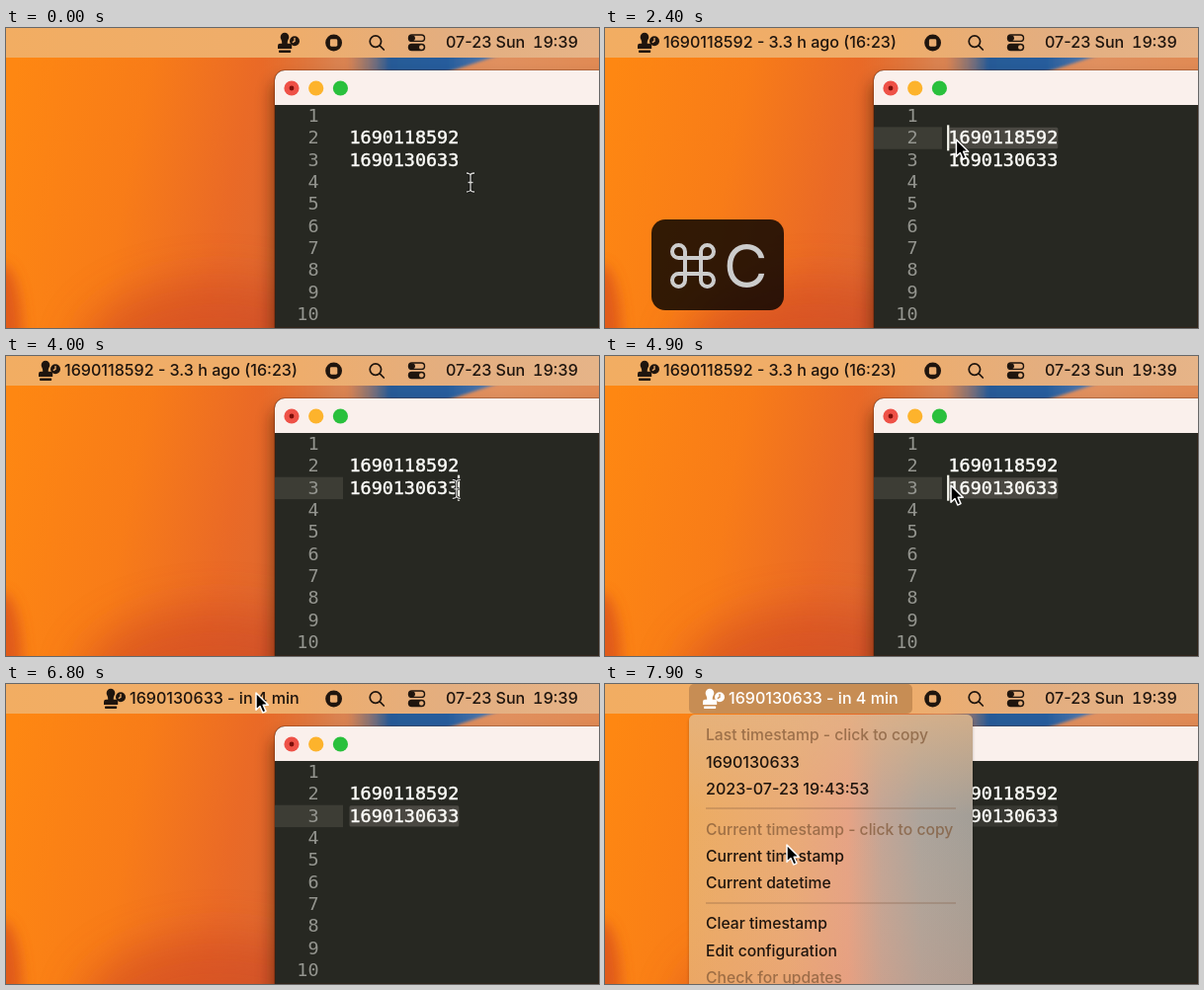
These frames come from a looping animation (600 by 304 pixels, 8000 ms). An HTML page:

```html
<!DOCTYPE html>
<html lang="en">
<head>
<meta charset="utf-8">
<title>Timestamp in the menu bar</title>
<style>
  html, body { margin: 0; width: 100%; height: 100%; overflow: hidden; background: #f0801c; }
  svg { display: block; width: 600px; height: 304px; }
  text { white-space: pre; }
  .ui { font: 500 16.1px Inter, Roboto, sans-serif; fill: currentColor; }
  .clock { font-variant-numeric: tabular-nums; }
  .letters { font-size: 15.7px; }
  .dim { fill: #7d5535; fill-opacity: .7; }
  .code { font: 18.4px "DejaVu Sans Mono", "Liberation Mono", monospace; fill: #fcfcf8; stroke: #fcfcf8; stroke-width: .45px; }
  .num { fill: #94958f; stroke: none; text-anchor: end; }
  .keys { font: 400 61px Inter, Roboto, sans-serif; fill: #ccc; }
</style>
</head>
<body>
<svg viewBox="0 0 600 304" color="#1f150e">
  <defs>
    <linearGradient id="wall" gradientUnits="userSpaceOnUse" x1="0" y1="90" x2="290" y2="150">
      <stop offset="0" stop-color="#fe8712"/><stop offset=".45" stop-color="#f87c18"/>
      <stop offset=".8" stop-color="#ea6a26"/><stop offset="1" stop-color="#df682f"/>
    </linearGradient>
    <linearGradient id="strip" gradientUnits="userSpaceOnUse" x1="260" y1="0" x2="600" y2="0">
      <stop offset="0" stop-color="#e27a38" stop-opacity="0"/><stop offset=".22" stop-color="#d98250"/>
      <stop offset=".7" stop-color="#e0905f"/><stop offset="1" stop-color="#e08a54"/>
    </linearGradient>
    <linearGradient id="petal" gradientUnits="userSpaceOnUse" x1="345" y1="0" x2="500" y2="0">
      <stop offset="0" stop-color="#5a6a88" stop-opacity="0"/><stop offset=".28" stop-color="#265a96"/>
      <stop offset=".65" stop-color="#255c9c"/><stop offset="1" stop-color="#5f7fae"/>
    </linearGradient>
    <linearGradient id="bar">
      <stop offset="0" stop-color="#f2ad62"/><stop offset=".5" stop-color="#eead6c"/>
      <stop offset=".75" stop-color="#e3ae80"/><stop offset="1" stop-color="#e6b488"/>
    </linearGradient>
    <linearGradient id="panel">
      <stop offset="0" stop-color="#ecac62"/><stop offset=".35" stop-color="#eaab76"/>
      <stop offset=".56" stop-color="#e6a385"/><stop offset=".68" stop-color="#c2a596"/>
      <stop offset=".82" stop-color="#aca49c"/><stop offset="1" stop-color="#a39e97"/>
    </linearGradient>
    <linearGradient id="glow" x1="0" y1="0" x2="0" y2="1">
      <stop offset="0" stop-color="#e4b484" stop-opacity=".7"/>
      <stop offset=".35" stop-color="#e4b484" stop-opacity="0"/>
      <stop offset="1" stop-color="#e88c6c" stop-opacity=".2"/>
    </linearGradient>
    <filter id="soft" x="-60%" y="-60%" width="220%" height="220%"><feGaussianBlur stdDeviation="22"/></filter>
    <filter id="near" x="-80%" y="-40%" width="260%" height="180%"><feGaussianBlur stdDeviation="7"/></filter>
    <filter id="edge" x="-20%" y="-60%" width="140%" height="220%"><feGaussianBlur stdDeviation="1.6"/></filter>
    <filter id="shade" x="-20%" y="-20%" width="140%" height="140%"><feGaussianBlur stdDeviation="8"/></filter>
  </defs>

  <!-- wallpaper -->
  <rect width="600" height="304" fill="url(#wall)"/>
  <ellipse cx="215" cy="330" rx="140" ry="75" fill="#cc4420" opacity=".55" filter="url(#soft)"/>
  <ellipse cx="-4" cy="310" rx="20" ry="70" fill="#d4481c" opacity=".7" filter="url(#near)"/>
  <rect x="260" y="24" width="340" height="34" fill="url(#strip)"/>
  <path d="M345 24H510L430 50H345Z" fill="url(#petal)" filter="url(#edge)"/>
  <rect width="600" height="30" fill="url(#bar)"/>

  <!-- editor window -->
  <rect x="269" y="54" width="380" height="300" rx="10" fill="#3a1205" opacity=".5" filter="url(#shade)"/>
  <path d="M272 304V53a10 10 0 0 1 10-10H600V304Z" fill="#272822" stroke="#4a1c08" stroke-opacity=".4" stroke-width="1.500"/>
  <path d="M272 78V53a10 10 0 0 1 10-10H600V78Z" fill="#faf0ec"/>
  <circle cx="289" cy="61" r="7.6" fill="#ee5147"/>
  <circle cx="289" cy="61" r="2.4" fill="#7c0f0b"/>
  <circle cx="313.7" cy="61" r="7.6" fill="#fdb32c"/>
  <circle cx="338.4" cy="61" r="7.6" fill="#29c03c"/>
  <rect id="gutter" x="272" width="69" height="22.4" fill="#3d3d35"/>
  <rect id="sel" height="21.4" rx="1.5" fill="#4a4842"/>
  <g id="lines"></g>
  <rect id="caret" width="2.2" height="26" fill="#f8f8f0"/>

  <!-- menu bar -->
  <rect id="lit" x="85" y="0" width="226" height="30" rx="5" fill="#c78d54"/>
  <g id="title">
    <g fill="currentColor">
      <path d="M7 4.800a4.300 4.300 0 0 1 4.300 4.300c0 2.600-1.800 3.300-1.500 6.600H12a2.200 2.200 0 0 1 2.200 2.200V21H0V17.900a2.200 2.200 0 0 1 2.200-2.200H4.200C4.500 12.400 2.700 11.700 2.700 9.100A4.300 4.300 0 0 1 7 4.800Z"/>
      <rect x="1" y="22.600" width="12.200" height="2.400" rx=".8"/>
      <circle cx="17" cy="13.200" r="5"/>
    </g>
    <path id="hands" d="M17 10V13.400L14.800 14.600" fill="none" stroke="#eead6c" stroke-width="1.300"/>
    <text id="label" class="ui" x="26" y="20.300"></text>
  </g>
  <circle cx="331.600" cy="15" r="8.400" fill="#1f150e"/>
  <rect x="327.900" y="11.300" width="7.400" height="7.400" rx="1.400" fill="#ebad70"/>
  <g fill="none" stroke="#1f150e" stroke-width="1.700" stroke-linecap="round">
    <circle cx="373.900" cy="13.600" r="5.700"/>
    <path d="M378.200 17.900L382.300 22"/>
    <rect x="407.500" y="7" width="16" height="6.400" rx="3.200" stroke-width="1.400"/>
  </g>
  <circle cx="410.900" cy="10.200" r="3" fill="#1f150e"/>
  <rect x="406.800" y="15.800" width="17.400" height="7.400" rx="3.700" fill="#1f150e"/>
  <circle cx="420.300" cy="19.500" r="2.300" fill="#e5ae7c"/>
  <text class="ui" x="445" y="20.300">07-23 Sun</text>
  <text class="ui clock" x="579" y="20.300" text-anchor="end">19:39</text>

  <!-- drop-down -->
  <g id="menu">
    <rect x="85" y="33" width="287" height="290" rx="6" opacity=".25" filter="url(#edge)"/>
    <rect x="85" y="31" width="287" height="290" rx="6" fill="url(#panel)"/>
    <rect x="85" y="31" width="287" height="290" rx="6" fill="url(#glow)"/>
    <path d="M102 126H355M102 222H355" stroke="#805a40" stroke-opacity=".55" stroke-width="1.200"/>
    <g id="items"></g>
  </g>

  <!-- pressed keys -->
  <g id="keys">
    <rect x="47" y="194" width="134" height="92" rx="14" fill="#000" fill-opacity=".8"/>
    <path transform="translate(89 241)" fill="none" stroke="#ccc" stroke-width="4"
      d="M-8-14.500a6.500 6.500 0 1 0-6.500 6.500h29a6.500 6.500 0 1 0-6.500-6.500v29a6.500 6.500 0 1 0 6.500-6.500h-29a6.500 6.500 0 1 0 6.500 6.500z"/>
    <text class="keys" x="120" y="263">C</text>
  </g>

  <!-- pointers -->
  <path id="arrow" d="M0 0V17.200L4 13.500L6.800 20L10 18.600L7.200 12.300H12.300Z" fill="#000" stroke="#fff" stroke-width="1.500" stroke-linejoin="round"/>
  <g id="beam" fill="none">
    <path id="ib" d="M-4-9.500C-2-9.500 0-8.500 0-7C0-8.500 2-9.500 4-9.500M0-7V7M-4 9.500C-2 9.500 0 8.500 0 7C0 8.500 2 9.500 4 9.500M-2.500 0H2.500" stroke="#111" stroke-width="2.600"/>
    <use href="#ib" style="stroke:#111"/>
    <path d="M-4-9.500C-2-9.500 0-8.500 0-7C0-8.500 2-9.500 4-9.500M0-7V7M-4 9.500C-2 9.500 0 8.500 0 7C0 8.500 2 9.500 4 9.500M-2.500 0H2.500" stroke="#d8d8d4" stroke-width="1.300"/>
  </g>
</svg>
<script>
const LOOP = 8000, STEP = 100;
const LEFT = 347.5, CHAR = 11.08, PITCH = 22.35, TOP = 78;
const $ = id => document.getElementById(id);
const set = (id, attrs) => { for (const k in attrs) $(id).setAttribute(k, attrs[k]); };
const show = (id, on) => set(id, { visibility: on ? 'visible' : 'hidden' });
const rowTop = n => TOP + (n - 1) * PITCH;
const clamp = (v, lo, hi) => Math.min(hi, Math.max(lo, v));

// pointer stops: time, x, y
const path = [
  [0, 470, 156.5], [200, 470, 156.5], [700, 462, 113], [900, 462, 113],
  [1600, 348, 111], [2300, 348, 111], [3000, 481.5, 146], [3200, 481.5, 146],
  [3700, 462, 135], [3900, 462, 135], [4600, 350, 131], [5300, 350, 131],
  [5900, 353, 129], [6100, 353, 129], [6800, 253, 9], [7000, 253, 9],
  [7700, 184, 163], [LOOP, 184, 163]
];
const drags = [
  { line: 2, down: 900, up: 1600 },
  { line: 3, down: 3900, up: 4600 }
];
const titles = [
  { from: 0, x: 275, text: '' },
  { from: 2400, x: 33, text: '1690118592 - 3.3 h ago (16:23)' },
  { from: 5500, x: 99, text: '1690130633 - in 4 min' }
];
const copies = [2100, 5240];
const blinks = [2350, 4800];
const MENU_AT = 7000;

const latest = (list, t, key) => list.filter(d => (key ? d[key] : d) <= t).pop();

function pointer(t) {
  const i = path.findIndex((p, k) => k && t <= p[0]);
  const [t0, x0, y0] = path[i - 1], [t1, x1, y1] = path[i];
  const u = (t - t0) / (t1 - t0), e = u * u * (3 - 2 * u);
  return [x0 + (x1 - x0) * e, y0 + (y1 - y0) * e];
}

function build() {
  const body = { 2: '1690118592', 3: '1690130633' };
  let out = '';
  for (let n = 1; n <= 10; n++) {
    const y = rowTop(n) + 17;
    out += `<text class="code num" x="316.5" y="${y}">${n}</text>`;
    if (body[n]) out += `<text class="code" x="${LEFT}" y="${y}">${body[n]}</text>`;
  }
  $('lines').innerHTML = out;

  const items = [
    [51, 'Last timestamp - click to copy', 'letters dim'],
    [79, '1690130633', ''],
    [106, '2023-07-23 19:43:53', ''],
    [147, 'Current timestamp - click to copy', 'letters dim'],
    [174, 'Current timestamp', 'letters'],
    [201.5, 'Current datetime', 'letters'],
    [242.5, 'Clear timestamp', 'letters'],
    [270, 'Edit configuration', 'letters'],
    [297, 'Check for updates', 'letters dim']
  ];
  $('items').innerHTML = items.map(([y, s, c]) =>
    `<text class="ui ${c}" x="102" y="${y + 5.8}">${s}</text>`).join('');
}

function drawEditor(t, x, y) {
  const drag = latest(drags, t, 'down');
  ['gutter', 'sel', 'caret'].forEach(id => show(id, drag));
  if (!drag) return false;
  const end = pointer(Math.min(t, drag.up))[0];
  const col = clamp(Math.round((end - LEFT) / CHAR), 0, 10);
  const top = rowTop(drag.line), from = LEFT + col * CHAR;
  set('gutter', { y: top });
  set('sel', { x: from, y: top + .5, width: (10 - col) * CHAR, opacity: t < MENU_AT ? 1 : .5 });
  const ref = latest(blinks, t);
  const blink = ref && t >= drag.up ? .5 + .6 * Math.cos((t - ref) / 1300 * 2 * Math.PI) : 1;
  set('caret', { x: from - 1.4, y: top - 2, opacity: clamp(blink, 0, 1) });
  return t >= drag.up && x >= from && x <= LEFT + 10 * CHAR && y >= top && y <= top + PITCH;
}

function draw(t) {
  const [x, y] = pointer(t);
  const overSel = drawEditor(t, x, y);
  const open = t >= MENU_AT;

  const title = latest(titles, t, 'from');
  set('title', { transform: `translate(${title.x} 0)`, color: open ? '#fff' : '#1f150e' });
  set('hands', { stroke: open ? '#c78d54' : '#eead6c' });
  if ($('label').textContent !== title.text) $('label').textContent = title.text;
  show('lit', open);
  show('menu', open);

  const age = t - (latest(copies, t) ?? -LOOP);
  set('keys', { opacity: clamp(1 - (age - 500) / 200, 0, 1) });

  const text = x > 341 && y > TOP && !overSel && !open;
  show('beam', text);
  show('arrow', !text);
  set(text ? 'beam' : 'arrow', { transform: `translate(${x} ${y})` });
}

build();
const start = performance.now();
function frame() {
  const t = (performance.now() - start) % LOOP;
  draw(Math.floor(t / STEP) * STEP);
  requestAnimationFrame(frame);
}
frame();
</script>
</body>
</html>
```
